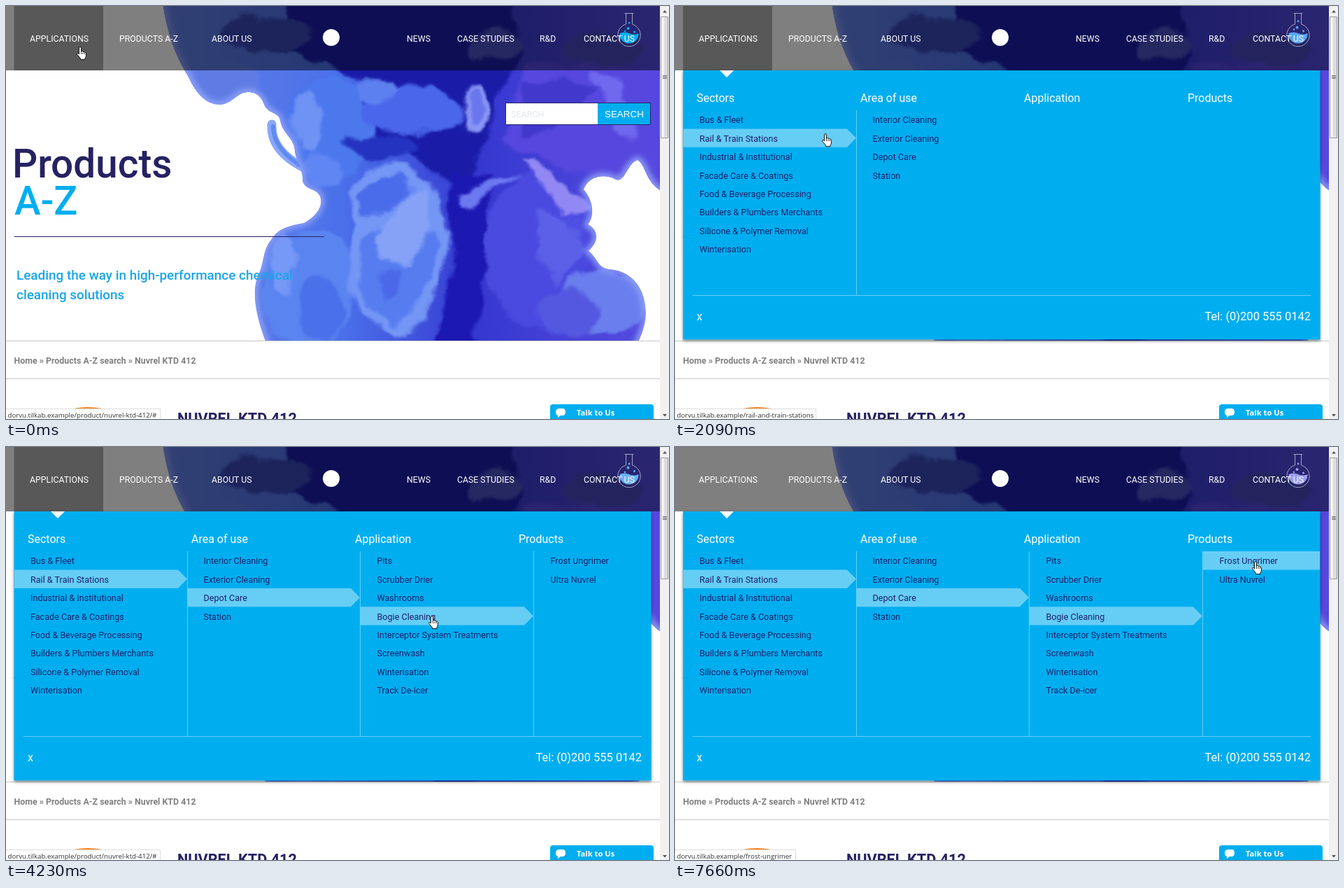
An HTML page that plays this animation: 948 px wide and 590 px high, repeating every 8 s.

```html
<!DOCTYPE html>
<html lang="en">
<head>
<meta charset="utf-8">
<title>Product menu</title>
<style>
html, body { margin: 0; width: 100%; height: 100%; overflow: hidden; background: #fff; }
svg { position: absolute; left: 0; top: 0; display: block; }
#hero { will-change: transform; }
text { font-family: Roboto, "Open Sans", sans-serif; white-space: pre; }
.nav text { font-size: 12.3px; fill: #fff; }
.title { font-size: 56.6px; font-weight: 500; }
.lead { font-size: 18.9px; font-weight: 500; fill: #1ba6ea; }
.head { font-size: 16px; fill: #fff; }
.item { font-size: 12.6px; fill: #1d1f6b; }
.status text { font: 9.7px "Open Sans", "Noto Sans", sans-serif; fill: #333; }
.rule { stroke: #66cef5; }
.mark { fill: #66cef5; }
.timed { animation: 8s step-end infinite; }
#hover { animation: leave 8s linear infinite; }
#cursor { animation: move 8s linear infinite; }
#fluid { animation: tint 8s linear infinite; }
.bubble { animation: rise 2s ease-in-out infinite alternate; }
.bubble:nth-child(odd) { animation-duration: 4s; }
@keyframes leave { 0%, 68.75% { opacity: 1 } 73.1%, 100% { opacity: 0 } }
@keyframes rise { to { transform: translateY(-2.5px) } }
@keyframes tint {
  0%, 14% { fill: #00aeef }
  26% { fill: #58a8f4 }
  38%, 43.5% { fill: #a0a0f5 }
  53% { fill: #6cb0f8 }
  62%, 82% { fill: #00aeef }
  92%, 100% { fill: #9c9ef5 }
}
@keyframes move {
  0%, 7.5% { transform: translate(108px, 67px) }
  11.25% { transform: translate(118px, 98px) }
  15.9% { transform: translate(152px, 180px) }
  23%, 26.1% { transform: translate(216px, 191px) }
  28% { transform: translate(268px, 196px) }
  31% { transform: translate(330px, 217px) }
  35.5% { transform: translate(520px, 219px) }
  41.25% { transform: translate(566px, 226px) }
  43.1% { transform: translate(576px, 242px) }
  50%, 56% { transform: translate(611px, 250px) }
  61.5% { transform: translate(750px, 240px) }
  63.75% { transform: translate(777px, 181px) }
  69.7% { transform: translate(831px, 172px) }
  72%, 100% { transform: translate(832px, 172px) }
}
</style>
</head>
<body>
<svg id="hero" width="948" height="590">
  <defs>
    <linearGradient id="tone">
      <stop offset="0" stop-color="#6480e6"/>
      <stop offset=".35" stop-color="#4a70ea"/>
      <stop offset=".62" stop-color="#3638d0"/>
      <stop offset="1" stop-color="#5a4ee2"/>
    </linearGradient>
    <filter id="swirl" x="-10%" y="-10%" width="120%" height="120%" color-interpolation-filters="sRGB">
      <feTurbulence type="fractalNoise" baseFrequency=".022" numOctaves="4" seed="4" result="n"/>
      <feGaussianBlur in="SourceGraphic" stdDeviation="2"/>
      <feDisplacementMap in2="n" scale="26" xChannelSelector="R" yChannelSelector="G"/>
    </filter>
    <filter id="soft"><feGaussianBlur stdDeviation="4"/></filter>
    <path id="cloud" d="M222 -20C228 40 245 76 260 100C270 122 284 141 306 141C324 140 330 123 346 123C360 123 366 132 370 143C376 154 390 152 392 164C396 184 412 188 413 206C414 222 426 236 424 250C428 264 444 260 449 272C454 286 444 300 426 310C404 314 388 318 379 334C366 350 370 366 360 386C350 410 358 452 380 500H893C912 470 917 446 914 430C912 402 894 378 862 376C846 374 846 360 833 350C846 338 850 322 832 312C842 300 840 278 826 262C834 242 856 240 870 247C884 256 888 224 903 220C918 228 912 264 960 272V-20Z"/>
    <clipPath id="edge"><use href="#cloud"/></clipPath>
  </defs>
  <path d="M380 169Q378 206 424 230" fill="none" stroke="#8aa8f8" stroke-width="13" stroke-linecap="round"/>
  <path d="M382 172Q382 204 424 230" fill="none" stroke="#5f8af2" stroke-width="6" stroke-linecap="round"/>
  <g clip-path="url(#edge)">
    <use href="#cloud" fill="url(#tone)"/>
    <g filter="url(#swirl)">
      <path fill="#1a1ca8" d="M400 -20H720L740 70 700 130 690 200 640 270 600 225 550 195 500 190 520 115 450 80 400 60Z"/>
      <path fill="#1c18b2" d="M630 240L690 240 690 360 670 460 690 500H600L640 380Z"/>
      <ellipse fill="#3a48b8" cx="370" cy="40" rx="70" ry="26"/>
      <ellipse fill="#5f7ce4" cx="318" cy="108" rx="44" ry="28"/>
      <ellipse fill="#4c50c4" cx="700" cy="58" rx="40" ry="20"/>
      <ellipse fill="#4648bc" cx="850" cy="62" rx="60" ry="24"/>
      <ellipse fill="#4c78ee" cx="462" cy="175" rx="62" ry="72"/>
      <ellipse fill="#6f92f5" cx="430" cy="165" rx="20" ry="46"/>
      <ellipse fill="#5f86f2" cx="450" cy="235" rx="30" ry="24"/>
      <ellipse fill="#4a66ea" cx="580" cy="150" rx="68" ry="34"/>
      <ellipse fill="#5c80f0" cx="530" cy="120" rx="30" ry="16"/>
      <ellipse fill="#2434c0" cx="535" cy="200" rx="50" ry="16"/>
      <ellipse fill="#8b97f5" cx="671" cy="146" rx="20" ry="34"/>
      <ellipse fill="#6a76ee" cx="670" cy="142" rx="12" ry="24"/>
      <path fill="#5648de" d="M740 85L960 85V290L870 250 800 230 710 200Z"/>
      <path fill="#4238cc" d="M735 110L800 95 850 120 790 170 740 190Z"/>
      <path fill="#7068ee" d="M840 95L880 110 905 190 870 175Z"/>
      <ellipse fill="#4a4ae0" cx="760" cy="350" rx="74" ry="112"/>
      <path fill="#9288f4" d="M738 224Q800 228 834 296Q804 314 778 268Z"/>
      <path fill="#6c78f0" d="M645 272Q690 234 735 245Q690 252 668 292Z"/>
      <path fill="#5c60e8" d="M760 290Q826 300 826 350L790 400 760 350Z"/>
      <ellipse fill="#5a84f0" cx="432" cy="402" rx="66" ry="84"/>
      <ellipse fill="#7698f6" cx="398" cy="370" rx="16" ry="44"/>
      <ellipse fill="#4a70ea" cx="450" cy="430" rx="34" ry="44"/>
      <ellipse fill="#6a7eee" cx="852" cy="425" rx="62" ry="46"/>
      <ellipse fill="#5458e0" cx="808" cy="440" rx="44" ry="34"/>
      <path fill="#7496f5" d="M488 265Q515 215 570 228Q605 245 622 285Q645 340 612 410Q590 470 562 470Q520 460 496 410Q482 350 500 310Z"/>
      <path fill="#4a6cea" d="M500 272Q530 238 570 245Q596 262 560 285Q520 305 512 300Z"/>
      <path fill="#567cf0" d="M512 335Q560 290 616 320Q624 350 600 400Q580 450 560 458Q516 440 502 395Z"/>
      <path fill="#86a2f7" d="M535 325Q570 260 602 262Q614 340 575 365Q535 380 535 325Z"/>
      <path fill="#4a68e8" d="M530 390L560 375 560 410 545 420Z"/>
    </g>
    <use href="#cloud" fill="none" stroke="#92a4f8" stroke-width="9" filter="url(#soft)"/>
  </g>
</svg>

<svg id="page" width="948" height="590">
  <text class="title" x="9" y="245" fill="#262262">Products</text>
  <text class="title" x="12" y="298" fill="#00aeef">A-Z</text>
  <path d="M11.500 329.500H455" stroke="#262262"/>
  <text class="lead" x="15" y="391">Leading the way in high-performance chemical</text>
  <text class="lead" x="15" y="419">cleaning solutions</text>
  <path fill="#fff" stroke="#23236b" d="M714.500 138.500H921.500V169.500H714.500Z"/>
  <path fill="#00aeef" d="M846 139H921V169H846Z"/>
  <text x="722" y="159" font-size="12.5" fill="#e4e6ea">SEARCH</text>
  <text x="856" y="159" fill="#fff" style="font:13.4px 'Liberation Sans',sans-serif">SEARCH</text>

  <path fill="#fff" d="M0 478H935V590H0Z"/>
  <path d="M0 478.5H935M0 532.5H935" stroke="#c8c8c8"/>
  <text x="11.500" y="511" font-size="12.4" font-weight="700" fill="#808080">Home » Products A-Z search » Nuvrel KTD 412</text>
  <circle cx="117" cy="670" r="97" fill="#f58220"/>
  <text x="245" y="597" font-size="21.7" font-weight="700" fill="#262262">NUVREL KTD 412</text>
  <path fill="#00aeef" d="M778 590V573Q778 569 782 569H922Q926 569 926 573V590Z"/>
  <path fill="#fff" d="M790 575H796Q800 575 800 580T796 585H793L789 588V585Q786 584 786 580T790 575Z"/>
  <text x="816" y="585" fill="#fff" style="font:700 11.2px 'Open Sans',sans-serif">Talk to Us</text>

  <path fill="#000" fill-opacity=".5" d="M0 0H935V92H0Z"/>
  <path id="hover" fill="#000" fill-opacity=".3" d="M11.500 0H139V92H11.500Z"/>
  <circle cx="465" cy="45" r="12" fill="#fff"/>
  <g id="flask">
    <path fill="none" stroke="#c9cfe6" stroke-opacity=".75" d="M884.500 10.500H897.500M886.500 11V26A16.200 16.200 0 1 0 895.500 26V11"/>
    <g id="fluid" fill="#00aeef">
      <path d="M877.500 39Q884 36 891 39T904.500 39A13.700 13.700 0 0 1 877.500 43Z"/>
      <circle class="bubble" cx="891" cy="24" r="1.500"/>
      <circle class="bubble" cx="889.500" cy="32" r="2"/>
      <circle class="bubble" cx="885" cy="36" r="1.300"/>
      <circle class="bubble" cx="898.500" cy="37" r="1.600"/>
    </g>
  </g>
  <g class="nav">
    <text x="34" y="51">APPLICATIONS</text>
    <text x="162" y="51">PRODUCTS A-Z</text>
    <text x="294" y="51">ABOUT US</text>
    <text x="573" y="51">NEWS</text>
    <text x="645" y="51">CASE STUDIES</text>
    <text x="763" y="51">R&amp;D</text>
    <text x="826" y="51">CONTACT US</text>
  </g>

  <g id="menu">
    <path fill="#00aeef" style="filter:drop-shadow(0 2px 2px rgba(0,0,0,.45))" d="M11.500 92H922.500V476.500H11.500Z"/>
    <path fill="#808080" d="M0 90H11V92H0Z"/>
    <path fill="#fff" d="M64 92H84L74 102Z"/>
    <path class="rule" d="M25 413.500H909M259.500 149V413"/>
    <text class="head" x="31" y="137">Sectors</text>
    <text class="head" x="265" y="137">Area of use</text>
    <text class="head" x="499" y="137">Application</text>
    <text class="head" x="733" y="137">Products</text>
    <text class="head" x="31" y="449">x</text>
    <text class="head" x="909" y="449" text-anchor="end" style="font-size:16.500px">Tel: (0)200 555 0142</text>
  </g>
  <g id="bars"></g>

  <g id="scroll">
    <path fill="#f1f1f1" d="M935 0H948V590H935Z"/>
    <path fill="#dcdcdc" stroke="#9a9a9a" d="M936.500 15.500H946.500V188.500H936.500Z"/>
    <path fill="#f3f3f3" d="M937 16H941V188H937Z"/>
    <path stroke="#666" d="M939 99.500H945M939 101.500H945M939 103.500H945"/>
    <path fill="#555" d="M939 9.500L942 6 945 9.500ZM939 583L942 586.500 945 583Z"/>
  </g>

  <g id="cursor">
    <path transform="translate(-7 -9)" fill="#fff" stroke="#111" stroke-linejoin="round"
      d="M3.500 11V2Q3.500 .5 5 .5T6.500 2V7Q7 6 8.200 6.300T9.300 7.500Q10 7 11 7.300T11.700 8.500Q12.500 8.200 13.300 8.900T13.500 11V13Q13.500 15 12 16.500V18.500H5.500V17L1 11.500Q0 9.800 1.200 9.300T3.500 11Z"/>
    <path stroke="#111" stroke-width=".8" d="M-.5 -2V2M2 -1V2M4.500 0V2"/>
  </g>
</svg>

<script>
const LOOP = 8000, ROW = 26.4, TOP = 149;
const MARK_X = [12, 259, 507, 755], TEXT_X = [35, 282.5, 530.5, 778.5];
const menu = document.getElementById('menu');
const bars = document.getElementById('bars');
const sheet = document.head.appendChild(document.createElement('style'));
let count = 0;

function add(parent, tag, attrs = {}, text = '') {
  const el = document.createElementNS('http://www.w3.org/2000/svg', tag);
  for (const key in attrs) el.setAttribute(key, attrs[key]);
  el.textContent = text;
  return parent.appendChild(el);
}

// Each span is [from, to, opacity]; outside the spans the element is hidden.
function show(el, ...spans) {
  const name = 'show' + count++;
  const pct = ms => ms / LOOP * 100 + '%';
  const steps = spans.map(([from, to, alpha = 1]) =>
    `${pct(from)}{opacity:${alpha}}${pct(to)}{opacity:0}`).join('');
  sheet.textContent += `@keyframes ${name}{0%{opacity:0}${steps}}`;
  el.classList.add('timed');
  el.style.animationName = name;
}

function list(col, from, to, names) {
  const g = add(menu, 'g');
  names.split('|').forEach((name, i) =>
    add(g, 'text', { class: 'item', x: TEXT_X[col], y: TOP + 18.4 + ROW * i }, name));
  if (to) show(g, [from, to]);
}

function mark(col, row, from, to = LOOP) {
  const start = `M${MARK_X[col]} ${TOP + ROW * row}`, h = ROW / 2;
  const d = col < 3 ? `${start}h234l13 ${h}l-13 ${h}h-234z` : `${start}h167v${ROW}h-167z`;
  show(add(menu, 'path', { class: 'mark', d }), [from, to]);
}

function divider(x, ...spans) {
  show(add(menu, 'path', { class: 'rule', d: `M${x} 149V413` }), ...spans);
}

function status(path, width, ...spans) {
  const g = add(bars, 'g', { class: 'status' });
  add(g, 'path', { d: `M-1 575.5H${width}V591H-1Z`, fill: '#fff', stroke: '#dcdcdc' });
  add(g, 'text', { x: 2.5, y: 588 }, 'dorvu.tilkab.example/' + path);
  show(g, ...spans);
}

const RAIL = 1270, AREA = 2240, DEPOT = 2480, WASH = 2840, BOGIE = 3570, PRODUCT = 5100;

divider(506.5, [150, RAIL], [DEPOT, LOOP]);
divider(754.5, [150, RAIL], [WASH, LOOP]);

mark(0, 1, RAIL);
mark(1, 1, AREA, DEPOT);
mark(1, 2, DEPOT);
mark(2, 2, WASH, BOGIE);
mark(2, 3, BOGIE);
mark(3, 0, PRODUCT);

list(0, 0, 0, 'Bus & Fleet|Rail & Train Stations|Industrial & Institutional|Facade Care & Coatings|' +
  'Food & Beverage Processing|Builders & Plumbers Merchants|Silicone & Polymer Removal|Winterisation');
list(1, 150, RAIL, 'Depot|Exterior Cleaning|Interior Cleaning');
list(1, RAIL, LOOP, 'Interior Cleaning|Exterior Cleaning|Depot Care|Station');
list(2, 150, RAIL, 'Scrubber Dryer|Pits|Washrooms|Facilities|Aerosols|Food Areas|Recycling System|BioCides|Winterisation');
list(2, DEPOT, LOOP, 'Pits|Scrubber Drier|Washrooms|Bogie Cleaning|Interceptor System Treatments|' +
  'Screenwash|Winterisation|Track De-icer');
list(3, 150, RAIL, 'BrawnTork Ungrimer|BrawnRinse QT');
list(3, WASH, BOGIE, 'Sentrolav Clear|Plinvex Dense|Velmiro Palmwash|Channel Blocks|VentLume');
list(3, BOGIE, LOOP, 'Frost Ungrimer|Ultra Nuvrel');

status('product/nuvrel-ktd-412/#', 220.5, [0, 150], [150, 300, .5], [AREA, 4770]);
status('rail-and-train-stations', 201.5, [RAIL, AREA]);
status('frost-ungrimer', 172.5, [PRODUCT, LOOP]);

show(menu, [150, LOOP]);
</script>
</body>
</html>
```
